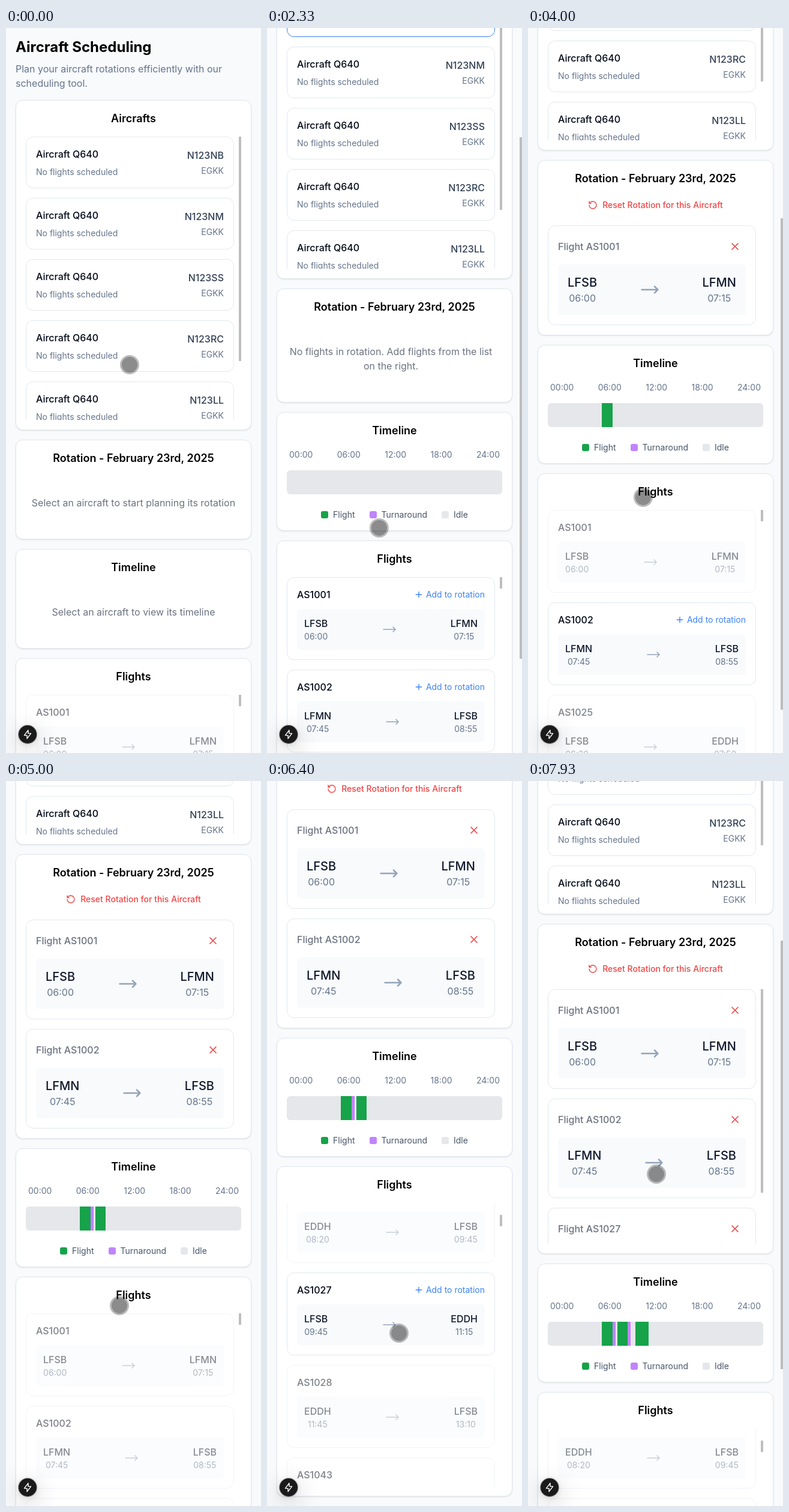
These frames come from a looping animation (425 px wide and 1208 px high, 8000 ms). An HTML page:

```html
<!DOCTYPE html>
<html lang="en">
<head>
<meta charset="utf-8">
<title>Aircraft Scheduling</title>
<style>
* { box-sizing: border-box; margin: 0; }
html, body { width: 100%; height: 100%; overflow: hidden; background: #f8fafc; }
body { position: relative; font: 16px/24px Inter, sans-serif; color: #020817; }
svg { display: block; fill: none; stroke: currentColor; stroke-linecap: round; stroke-linejoin: round; }
main { position: absolute; width: 425px; padding: 16px; }
h1 { font-size: 24px; line-height: 32px; font-weight: 700; color: #000; }
h1 + p { margin: 8px 0 16px; color: #64748b; }
h2 { font-size: 18px; line-height: 28px; font-weight: 600; text-align: center; color: #000; }
section { margin-bottom: 16px; padding: 16px; background: #fff; border: 1px solid #e2e8f0; border-radius: 12px;
  box-shadow: 0 1px 3px rgba(0,0,0,.08), 0 1px 2px -1px rgba(0,0,0,.08); }
.row { display: flex; justify-content: space-between; align-items: center; }
.small { font-size: 14px; line-height: 20px; }
.muted { color: #64748b; }
.medium { font-weight: 500; }
.list { position: relative; height: 472px; margin-top: 16px; overflow: hidden; }
.item { width: 347px; margin-bottom: 16px; padding: 16px; border: 1px solid #e2e8f0; border-radius: 12px; background: #fff; }
.thumb { position: absolute; right: 0; top: 0; width: 4px; background: #bdbdbd; }
.plane { height: 86px; }
.plane .muted { margin-top: 8px; }
.plane .tail { text-align: right; color: #334155; }
.tail .muted { margin-top: 4px; }
.leg { margin-top: 12px; padding: 12px; border-radius: 6px; background: #f8fafc; text-align: center; }
.leg svg { color: #94a3b8; }
.leg.big { padding: 16px; }
.big .code { font-size: 20px; line-height: 28px; }
.big .small { font-size: 16px; line-height: 24px; }
.code { font-weight: 500; color: #0f172a; }
.add { display: flex; align-items: center; gap: 4px; color: #3b82f6; }
.note { padding: 48px 0 32px; text-align: center; color: #6b7280; }
.note.narrow { width: 347px; }
.reset { display: flex; height: 36px; margin: 12px 0 -0px; align-items: center; justify-content: center; gap: 8px; color: #ef4444; }
.stop { height: 36px; color: #6b7280; }
.stop svg { margin-right: 8px; color: #ef4444; }
.hours { margin: 16px 0; padding: 0 4px; }
.bar { position: relative; height: 40px; border-radius: 6px; background: #e5e7eb; overflow: hidden; }
.bar i { position: absolute; height: 100%; }
.legend { display: flex; justify-content: center; gap: 24px; margin-top: 24px; color: #475569; }
.legend span { display: flex; align-items: center; gap: 8px; }
.legend i { width: 12px; height: 12px; border-radius: 3px; }
#badge { position: absolute; left: 21px; top: 1162px; width: 30px; height: 30px; border-radius: 50%; padding: 7px;
  background: #1a1a1a; color: #fff; box-shadow: 0 0 0 1px #33333366, 0 11px 40px rgba(0,0,0,.25), 0 2px 10px rgba(0,0,0,.12); }
#cursor { position: absolute; left: -16px; top: -16px; width: 32px; height: 32px; border-radius: 50%;
  background: radial-gradient(circle, rgba(0,0,0,.45) 12.6px, rgba(0,0,0,.27) 13.4px); }
#pageThumb { left: 421px; }
</style>
</head>
<body>
<main>
  <h1>Aircraft Scheduling</h1>
  <p>Plan your aircraft rotations efficiently with our scheduling tool.</p>
  <section><h2>Aircrafts</h2><div class="list" id="planes"></div></section>
  <section id="rotation"></section>
  <section id="timeline"></section>
  <section><h2>Flights</h2><div class="list"><div id="flights"></div><div class="thumb" id="flightThumb"></div></div></section>
</main>
<div class="thumb" id="pageThumb"></div>
<div id="badge"></div>
<div id="cursor"></div>
<script>
const $ = id => document.getElementById(id);
const LOOP = 8000, VIEW = 1208, LIST = 472;
const GREEN = '#16a34a', PURPLE = '#c084fc', GREY = '#e5e7eb', BLUE = '#3b82f6';

const icon = (size, path, stroke = 2, box = 24) =>
  `<svg width="${size}" height="${size}" viewBox="0 0 ${box} ${box}" stroke-width="${stroke}"><path d="${path}"/></svg>`;
const ARROW = 'M18 8l4 4-4 4M2 12h20';
const PLUS = 'M5 12h14M12 5v14';
const CROSS = 'M18 6L6 18M6 6l12 12';
const UNDO = 'M3 12a9 9 0 1 0 9-9 9.75 9.75 0 0 0-6.74 2.74L3 8M3 3v5h5';
const BOLT = 'M9 1V6.4H13.6L7 15V9.6H2.4Z';

const flights = [
  'AS1001 LFSB 06:00 LFMN 07:15', 'AS1002 LFMN 07:45 LFSB 08:55', 'AS1025 LFSB 06:20 EDDH 07:50',
  'AS1026 EDDH 08:20 LFSB 09:45', 'AS1027 LFSB 09:45 EDDH 11:15', 'AS1028 EDDH 11:45 LFSB 13:10',
  'AS1043 LFPO 06:30 LFMN 07:50',
].map(line => {
  const [name, from, dep, to, arr] = line.split(' ');
  return { name, from, dep, to, arr };
});
const FLIGHT_TOTAL = 76 * 154 - 16;
const picks = [0, 1, 4].map(i => flights[i]);

// The first click selects the aircraft, the others add a flight each.
const clicks = [1270, 3330, 4670, 6870];
const presses = [{ at: 2930, flight: 0 }, { at: 4470, flight: 1 }, { at: 6680, flight: 4 }];

// time, x, y
const cursorKeys = [
  [60, 206, 561], [600, 189, 236], [1450, 189, 236], [2070, 188, 1085], [2130, 188, 1085], [2510, 186, 621],
  [2750, 305, 732], [3800, 305, 732], [3960, 192, 784], [3975, 192, 784], [4275, 190, 684], [4560, 305, 888],
  [4800, 305, 888], [4980, 189, 874], [5005, 189, 874], [5300, 194, 690], [5470, 200, 1130], [5530, 200, 1130],
  [5820, 206, 880], [6020, 214, 1170], [6050, 214, 1170], [6330, 220, 920], [6400, 220, 920], [6650, 305, 848],
  [6980, 305, 848], [7200, 210, 355], [7270, 210, 355], [7930, 214, 655],
];
// time, offset
const pageKeys = [[2130, 0], [2510, 464], [3975, 464], [4275, 564], [5005, 564], [5300, 748], [7270, 748], [7930, 448]];
const listKeys = [[5530, 0], [5820, 250], [6050, 250], [6330, 500]];
// time, opacity
const thumbKeys = [[2130, 0], [2131, 1], [2930, 1], [3130, 0], [3975, 0], [3976, 1], [4750, 1], [4950, 0],
  [5005, 0], [5006, 1], [5750, 1], [5950, 0], [7270, 0], [7271, 1]];

const clamp = v => Math.min(1, Math.max(0, v));
const mix = (a, b, p) => a + (b - a) * p;
const smooth = p => p * p * (3 - 2 * p);

function track(keys, t) {
  const next = keys.findIndex(key => key[0] > t);
  if (next === 0) return keys[0].slice(1);
  if (next < 0) return keys.at(-1).slice(1);
  const a = keys[next - 1], b = keys[next];
  const p = smooth((t - a[0]) / (b[0] - a[0]));
  return a.slice(1).map((v, i) => mix(v, b[i + 1], p));
}

const stop = (code, time) => `<div><div class="code">${code}</div><div class="small muted">${time}</div></div>`;
const leg = (f, big) => `<div class="leg row ${big ? 'big' : ''}">${stop(f.from, f.dep)}
  ${big ? icon(32, ARROW) : icon(24, ARROW, 1.5)}${stop(f.to, f.arr)}</div>`;
const thumb = (view, total) => `<div class="thumb" style="height:${view * view / total}px"></div>`;

function rotationHtml(state) {
  const title = '<h2>Rotation - February 23rd, 2025</h2>';
  if (state === 0) return title + '<p class="note">Select an aircraft to start planning its rotation</p>';
  if (state === 1) return title + '<p class="note narrow">No flights in rotation. Add flights from the list on the right.</p>';
  const legs = picks.slice(0, state - 1);
  const total = legs.length * 182 - 16, view = Math.min(424, total);
  return `${title}<div class="reset small medium">${icon(16, UNDO)}Reset Rotation for this Aircraft</div>
    <div class="list" style="height:${view}px">${legs.map(f => `<div class="item">
      <div class="row stop medium">Flight ${f.name}${icon(20, CROSS)}</div>${leg(f, true)}</div>`).join('')}
      ${total > view ? thumb(view, total) : ''}</div>`;
}

function timelineHtml(state) {
  const title = '<h2>Timeline</h2>';
  if (state === 0) return title + '<p class="note">Select an aircraft to view its timeline</p>';
  const hours = time => { const [h, m] = time.split(':'); return +h + m / 60; };
  const block = (start, length, color) =>
    `<i style="left:${start / .24}%;width:${length / .24}%;background:${color}"></i>`;
  const legs = picks.slice(0, state - 1);
  const blocks = legs.map((f, i) => {
    const dep = hours(f.dep), arr = hours(f.arr);
    return block(dep, arr - dep, GREEN) + (i < legs.length - 1 ? block(arr, 1 / 3, PURPLE) : '');
  });
  const labels = [0, 6, 12, 18, 24].map(h => `<span>${String(h).padStart(2, '0')}:00</span>`);
  const legend = [['Flight', GREEN], ['Turnaround', PURPLE], ['Idle', GREY]]
    .map(([name, color]) => `<span><i style="background:${color}"></i>${name}</span>`);
  return `${title}<div class="row hours small muted">${labels.join('')}</div><div class="bar">${blocks.join('')}</div>
    <div class="legend small">${legend.join('')}</div>`;
}

function isOpen(f, state) {
  if (state < 2) return state === 1;
  const last = picks[state - 2];
  return f.from === last.to && f.dep > last.arr;
}

$('badge').innerHTML = icon(16, BOLT, 1.4, 16);
$('planes').innerHTML = ['NB', 'NM', 'SS', 'RC', 'LL'].map(tail => `<div class="item plane row">
  <div><div class="medium">Aircraft Q640</div><div class="small muted">No flights scheduled</div></div>
  <div class="tail"><div class="medium">N123${tail}</div><div class="small muted">EGKK</div></div></div>`).join('')
  + thumb(LIST, 6 * 102 - 16);
$('flights').innerHTML = flights.map(f => `<div class="item"><div class="row"><span class="medium">${f.name}</span>
  <span class="add small">${icon(16, PLUS)}Add to rotation</span></div>${leg(f)}</div>`).join('');
$('flightThumb').style.height = LIST * LIST / FLIGHT_TOTAL + 'px';

const main = document.querySelector('main');
const firstPlane = $('planes').firstElementChild;
const flightItems = [...$('flights').children];
const border = (p, color) => `color-mix(in srgb, ${color} ${p * 100}%, #e2e8f0)`;
const pageHeights = [1616, 1672, 1774, 1956, 2032];
let shown = -1;

function showState(state) {
  shown = state;
  $('rotation').innerHTML = rotationHtml(state);
  $('timeline').innerHTML = timelineHtml(state);
  flightItems.forEach((item, i) => {
    item.querySelector('.add').style.display = isOpen(flights[i], state) ? '' : 'none';
  });
}

function render(t) {
  const state = clicks.filter(at => t >= at).length;
  if (state !== shown) showState(state);

  const fade = state ? clamp((t - clicks[state - 1] + 60) / 200) : 1;
  flightItems.forEach((item, i) => {
    const level = s => isOpen(flights[i], s) ? 1 : .5;
    item.style.opacity = mix(level(Math.max(0, state - 1)), level(state), fade);
    const press = presses.findIndex(p => p.flight === i);
    const held = press >= 0 && t < clicks[press + 1];
    item.style.borderColor = border(held ? clamp((t - presses[press].at) / 150) : 0, '#cbd5e1');
  });
  firstPlane.style.borderColor = border(clamp((t - 900) / 150), BLUE);

  const [page] = track(pageKeys, t), [list] = track(listKeys, t), [x, y] = track(cursorKeys, t);
  main.style.top = -Math.round(page) + 'px';
  $('flights').style.transform = `translateY(${-Math.round(list)}px)`;
  $('flightThumb').style.top = list * LIST / FLIGHT_TOTAL + 'px';
  $('cursor').style.transform = `translate(${x}px, ${y}px)`;

  const scale = VIEW / pageHeights[state];
  Object.assign($('pageThumb').style, {
    top: page * scale + 'px', height: VIEW * scale - 4 + 'px', opacity: track(thumbKeys, t)[0],
  });
}

function tick() {
  render(performance.now() % LOOP);
  requestAnimationFrame(tick);
}
tick();
</script>
</body>
</html>
```
